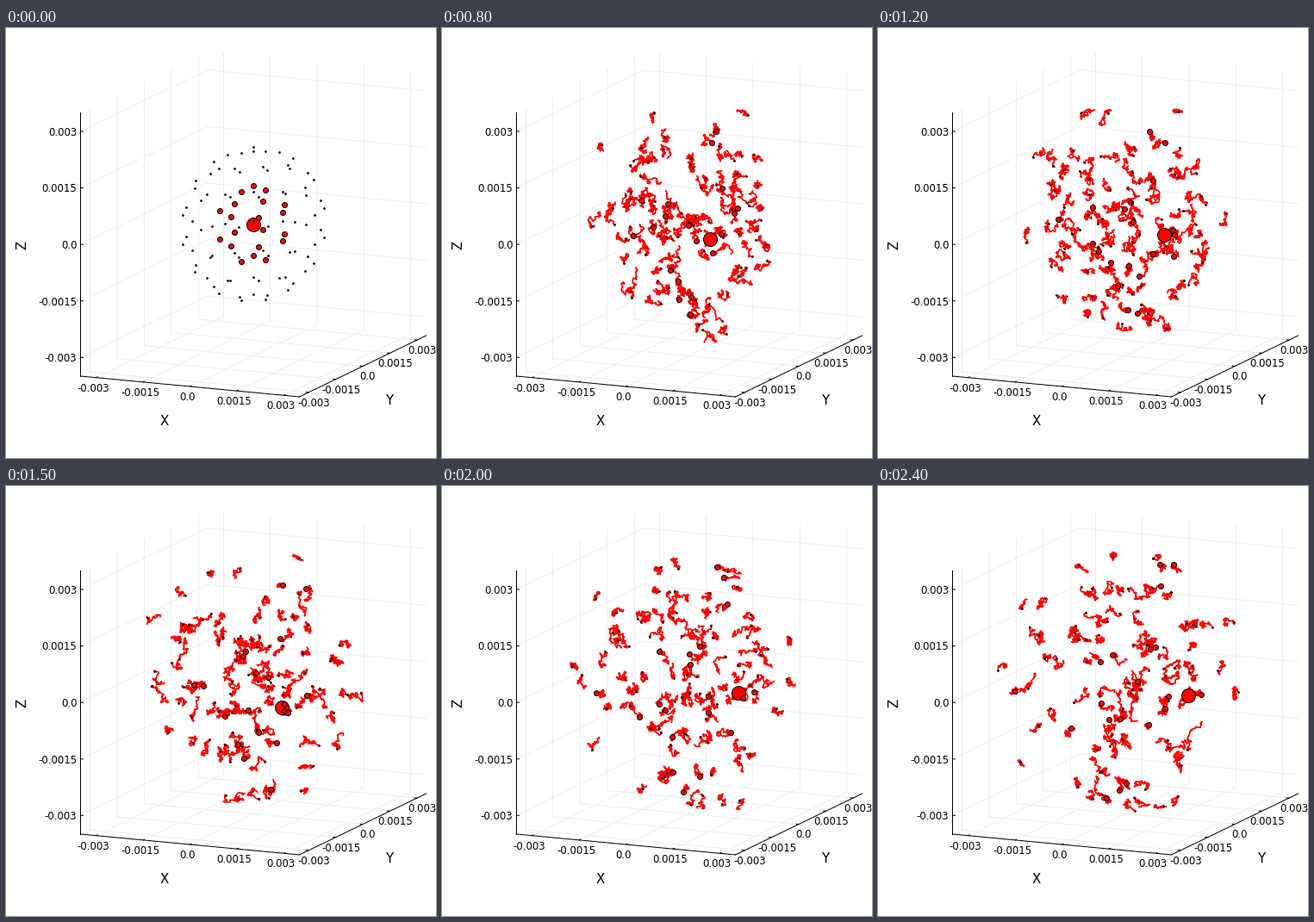
Write a matplotlib script that moves like this. It is 499x499 px and loops after 2500 ms.

```python
import numpy as np
import matplotlib.pyplot as plt
from matplotlib.animation import FuncAnimation

SIDE = 499
PX = 72 / SIDE          # points per pixel at dpi = SIDE
FRAMES = 25
SUB = 50                # walk steps per frame
STEPS = (FRAMES - 1) * SUB
TAIL = 58               # steps kept in a trail
LIMIT = 3.5             # axis half range, in thousandths
REACH = 165             # how far from the middle particles can stray
CORE = np.array([286.5, 227.0])
BASIS = np.array([[127, 12], [73.5, -35.5], [0, -153]]) / LIMIT
rng = np.random.default_rng(12)


def project(points):
    return CORE + np.asarray(points, float) @ BASIS


def shell(count, radius):
    """Spread points evenly over a sphere, ring by ring."""
    area = 4 * np.pi / count
    rings = round(np.pi / np.sqrt(area))
    gap = area / (np.pi / rings)
    points = []
    for i in range(rings):
        tilt = np.pi * (i + 0.5) / rings
        n = round(2 * np.pi * np.sin(tilt) / gap)
        for turn in 2 * np.pi * np.arange(n) / n:
            points.append([np.sin(tilt) * np.cos(turn),
                           np.sin(tilt) * np.sin(turn), np.cos(tilt)])
    return radius * np.array(points)


def jitter(count):
    steps = rng.normal(0, [1.15, 1.25], (STEPS, count, 2))
    return np.concatenate([np.zeros((1, count, 2)), steps.cumsum(axis=0)])


def diffuse(points, spread):
    """Random walks that also drift outward from the middle."""
    start = project(points) - CORE
    t = np.linspace(0, 1, STEPS + 1)[:, None, None]
    off = start * (1 + t * np.array(spread)) + jitter(len(start))
    r = np.linalg.norm(off, axis=2, keepdims=True)
    return CORE + off / (1 + (r / REACH) ** 8) ** (1 / 8)


def guided(keys):
    """Random walk pinned to (frame, x, y) key points."""
    frames, *places = np.array(keys).T
    pins = frames.astype(int) * SUB
    t = np.arange(STEPS + 1)
    path = jitter(1)
    for axis, place in enumerate(places):
        path[:, 0, axis] += np.interp(t, pins, place - path[pins, 0, axis])
    return path


groups = [
    guided([(0, 286.5, 227.5), (4, 293, 204), (8, 311, 245), (12, 332, 240),
            (18, 326, 251), (20, 344, 240), (24, 360, 242.5)]),
    diffuse(shell(20, 1), (0.4, 1.3)),
    diffuse(shell(80, 2), (0.15, 0.45)),
]
walks = np.concatenate(groups, axis=1)

plt.rcParams["font.family"] = "DejaVu Sans"
fig = plt.figure(figsize=(1, 1), dpi=SIDE, facecolor="white")
ax = fig.add_axes([0, 0, 1, 1])
ax.set_xlim(-0.5, SIDE - 0.5)
ax.set_ylim(SIDE - 0.5, -0.5)
ax.axis("off")


def segment(a, b, color="black", width=1.0):
    (x0, y0), (x1, y1) = project([a, b])
    ax.plot([x0, x1], [y0, y1], color=color, lw=width * PX, zorder=1)


def label(x, y, text, size=11.7, ha="center", **kw):
    ax.text(x, y, text, fontsize=size * PX, ha=ha, va="center_baseline", **kw)


def draw_axes():
    L, tick = LIMIT, 0.08
    for v in np.linspace(-3, 3, 5):
        name = f"{v / 1000:.4f}".rstrip("0") if v else "0.0"
        for a, b in [((v, -L, -L), (v, L, -L)), ((v, L, -L), (v, L, L)),
                     ((-L, v, -L), (L, v, -L)), ((-L, v, -L), (-L, v, L)),
                     ((-L, -L, v), (-L, L, v)), ((-L, L, v), (L, L, v))]:
            segment(a, b, "#eeeeee", 0.9)
        segment((v, -L, -L), (v, -L + tick, -L))
        segment((L, v, -L), (L - tick, v, -L))
        segment((-L, -L, v), (-L + tick, -L, v))
        x, y = project((v, -L, -L))
        label(x - 3, y + 11, name)
        x, y = project((L, v, -L))
        label(x + 6, y + 11, name)
        x, y = project((-L, -L, v))
        label(x - 4, y, name, ha="right")
    segment((-L, -L, -L), (-L, -L, L))
    segment((-L, -L, -L), (L, -L, -L))
    segment((L, -L, -L), (L, L, -L))
    label(183, 455, "X", 15)
    label(445, 431, "Y", 15)
    ax.text(18, 251, "Z", fontsize=15 * PX, rotation=90,
            ha="center", va="center")


draw_axes()
trails, = ax.plot([], [], color="red", lw=1.7 * PX, zorder=2,
                  solid_joinstyle="round")
dots = [ax.plot([], [], "o", ms=size * PX, mfc="red", mec="black",
                mew=PX, zorder=3 + i)[0]
        for i, size in enumerate([16, 6, 1.7])]


def draw(frame):
    now = frame * SUB
    tail = walks[max(0, now - TAIL):now + 1]
    gap = np.full((1,) + tail.shape[1:], np.nan)
    lines = np.concatenate([tail, gap]).swapaxes(0, 1).reshape(-1, 2)
    trails.set_data(lines.T if frame else ([], []))
    for dot, group in zip(dots, groups):
        dot.set_data(group[now, :, 0], group[now, :, 1])
    return [trails, *dots]


anim = FuncAnimation(fig, draw, frames=FRAMES, interval=100,
                     repeat=True, repeat_delay=0, blit=False)
plt.show()
```
